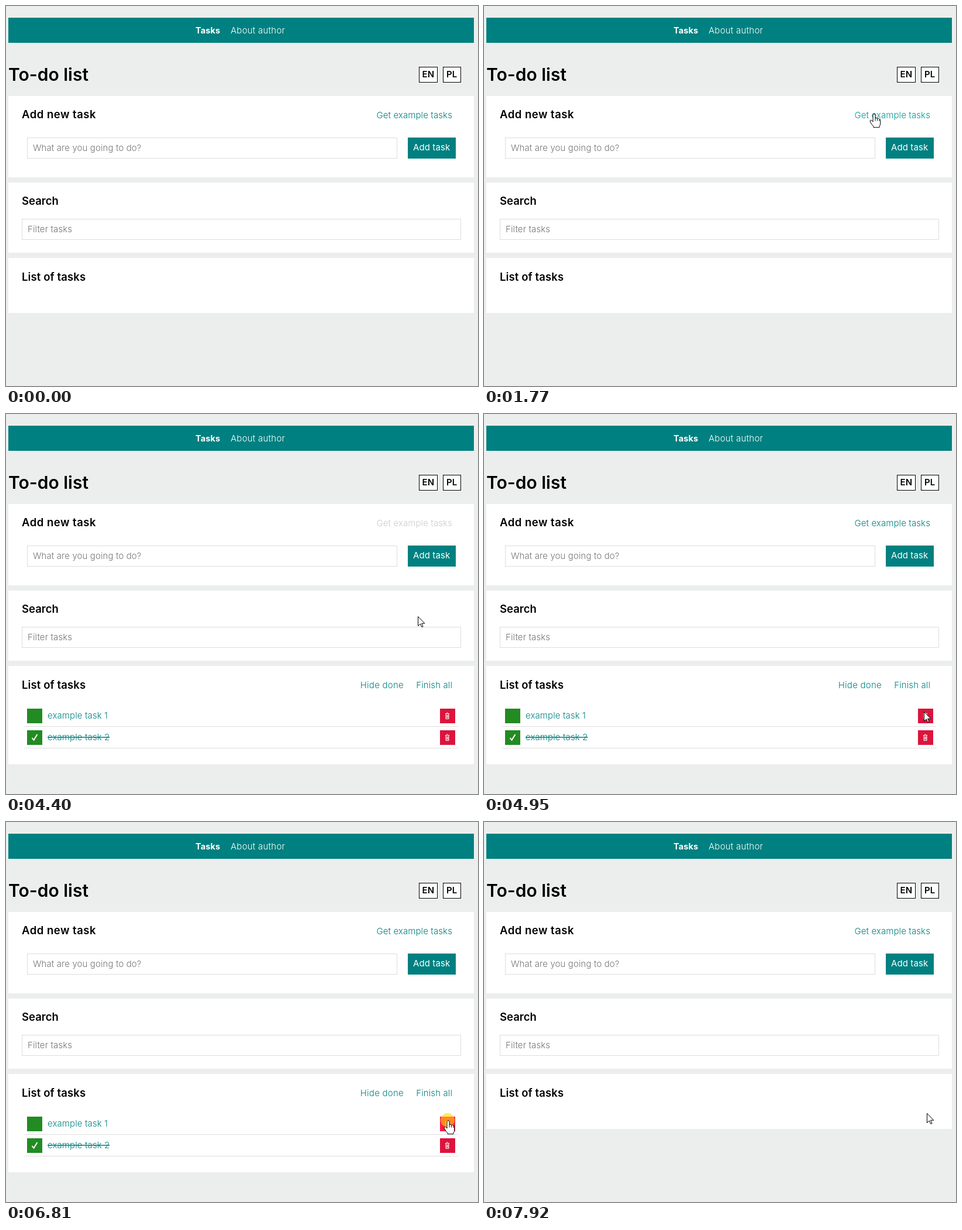
These frames come from a looping animation (807x650 px, 7990 ms). An HTML page:

```html
<!DOCTYPE html>
<html lang="en">
<head>
<meta charset="utf-8">
<title>To-do list</title>
<style>
  html, body { margin: 0; width: 100%; height: 100%; overflow: hidden; background: #eceeed; }
  svg { display: block; width: 807px; height: 650px; }
  text { font: 300 15px Inter, "Open Sans", sans-serif; fill: teal; letter-spacing: .1px; }
  .h2 { font-weight: 600; font-size: 18.5px; fill: #000; letter-spacing: .1px; }
  .h1 { font-weight: 600; font-size: 30px; fill: #000; letter-spacing: 0; }
  .lang { font-weight: 600; fill: #000; }
  .hint { fill: #757575; }
  .light { fill: #fff; }
  .end { text-anchor: end; }
  .panel { fill: #fff; }
  .field { fill: #fff; stroke: #ddd; }
  .box { fill: #fff; stroke: #000; }
  .rule { stroke: #ddd; }
  .mark { fill: none; stroke: #fff; }
  #pointer path { fill: #fff; stroke: #000; stroke-linejoin: round; }
</style>
</head>
<body>
<svg viewBox="0 0 807 650">
  <rect x="4" y="20" width="796" height="43" fill="teal"/>
  <text x="324" y="47" class="light" style="font-weight:700;font-size:14.5px">Tasks</text>
  <text x="384" y="47" class="light" style="letter-spacing:.25px">About author</text>

  <text x="4" y="128" class="h1">To-do list</text>
  <rect x="706.5" y="104.5" width="31" height="26" class="box"/>
  <text x="711.5" y="122" class="lang">EN</text>
  <rect x="747.5" y="104.5" width="30" height="26" class="box"/>
  <text x="753" y="122" class="lang">PL</text>

  <rect x="4" y="154" width="796" height="139" class="panel"/>
  <text x="27" y="192" class="h2" style="letter-spacing:.5px">Add new task</text>
  <text x="763" y="192" class="end" id="fetch"></text>
  <rect x="36.5" y="225.5" width="632" height="35" class="field"/>
  <text x="46" y="248" class="hint">What are you going to do?</text>
  <rect x="687" y="225" width="82" height="36" fill="teal"/>
  <text x="696" y="247" class="light" style="font-weight:400">Add task</text>

  <rect x="4" y="302" width="796" height="120" class="panel"/>
  <text x="27" y="340" class="h2" style="letter-spacing:0">Search</text>
  <rect x="27.5" y="364.5" width="750" height="35" class="field"/>
  <text x="37" y="387" class="hint">Filter tasks</text>

  <rect x="4" y="431" width="796" height="94" class="panel" id="list"/>
  <text x="27" y="470" class="h2">List of tasks</text>
  <g id="actions">
    <text x="680" y="469" class="end" style="letter-spacing:.25px">Hide done</text>
    <text x="763" y="469" class="end">Finish all</text>
  </g>
  <g id="rows"></g>

  <circle id="click" r="12" fill="#ffd700" fill-opacity=".6"/>
  <g id="pointer">
    <path id="arrow" d="M.5.5V16.5L4.3 13 6.8 18.5 9 17.6 6.6 12.2H11.8Z"/>
    <g id="hand">
      <path d="M-2 2.5Q0-1.5 2 2.5V8Q4.3 6.2 5.5 8.5 7.8 7 9 9.5 10.7 9.2 10.7 11.5V16Q10.7 20 9 22V23.7H-1V22Q-4 19-6.8 14-7.5 11.3-5.3 11.2-4 11.3-2 14Z"/>
      <path d="M2 8v4.5M5.5 9v3.5M9 10v3"/>
    </g>
  </g>
</svg>
<script>
const LOOP = 7990;
const $ = id => document.getElementById(id);
const between = (t, a, b) => t >= a && t < b;
const show = (el, on) => el.style.display = on ? "" : "none";

// Linear interpolation through [time, ...values] stops.
function track(t, stops) {
  const next = stops.findIndex(s => s[0] > t);
  if (next === 0) return stops[0].slice(1);
  if (next < 0) return stops[stops.length - 1].slice(1);
  const a = stops[next - 1], b = stops[next];
  const k = (t - a[0]) / (b[0] - a[0]);
  return a.slice(1).map((v, i) => v + (b[i + 1] - v) * k);
}
const rgb = c => `rgb(${c.map(Math.round)})`;

const path = [
  [460, 645, 626], [700, 648, 450], [900, 657, 283], [1220, 668, 190], [1500, 667, 184],
  [2100, 667, 184], [2300, 678, 235], [2500, 697, 325], [2720, 704, 346],
  [4400, 704, 346], [4650, 712, 385], [4900, 748, 500], [5160, 766, 545],
  [5300, 766, 543], [5510, 760, 525], [5750, 757, 514], [6000, 756, 510]
];
const linkColor = [
  [1150, 0, 128, 128], [1350, 0, 153, 153], [2030, 0, 153, 153],
  [2400, 204, 204, 204], [4400, 204, 204, 204], [4800, 0, 128, 128]
];
const red = [220, 20, 60], bright = [255, 24, 72];
const binColor = [
  [[5500, ...red], [5750, ...bright]],
  [[5050, ...red], [5200, ...bright], [5510, ...bright], [5750, ...red], [6950, ...red], [7150, ...bright]]
];

$("rows").innerHTML = [1, 2].map(n => `<g>
  <rect x="36" y="504" width="26" height="25" fill="#228b22"/>
  ${n === 2 ? '<path d="M44.5 517l3 3.8 6-9.8" class="mark" stroke-width="2"/>' : ""}
  <text x="71" y="521" ${n === 2 ? 'text-decoration="line-through"' : ""}>example task ${n}</text>
  <rect x="742" y="504" width="26" height="25" class="bin"/>
  <path d="M751 512.5h7M753.5 511h2M752 513v8.5h5V513M753.7 514.5v5.5M755.5 514.5v5.5" class="mark"/>
  <path d="M31 534.5H773" class="rule"/></g>`).join("");
const rows = [...$("rows").children];

function draw(t) {
  $("fetch").textContent = between(t, 2100, 4400) ? "Loading..." : "Get example tasks";
  $("fetch").style.fill = rgb(track(t, linkColor));

  const visible = [between(t, 4400, 6950), between(t, 4400, 7500)];
  let count = 0;
  rows.forEach((row, i) => {
    show(row, visible[i]);
    row.setAttribute("transform", `translate(0 ${count * 37})`);
    row.querySelector(".bin").style.fill = rgb(track(t, binColor[i]));
    if (visible[i]) count++;
  });
  show($("actions"), count > 0);
  $("list").setAttribute("height", 94 + count * 37);

  const [x, y] = t < 7920 ? track(t, path) : [757, 498];
  const hand = between(t, 1150, 2170) || between(t, 5050, 5330) || between(t, 5480, 7920);
  show($("pointer"), t >= 460);
  show($("hand"), hand);
  show($("arrow"), !hand);
  $("pointer").setAttribute("transform", `translate(${Math.round(x)} ${Math.round(y)})`);

  show($("click"), between(t, 1900, 2030) || between(t, 6810, 6950) || between(t, 7290, 7430));
  $("click").setAttribute("cx", x - 1);
  $("click").setAttribute("cy", y);
}

function tick() {
  draw(performance.now() % LOOP);
  requestAnimationFrame(tick);
}
tick();
</script>
</body>
</html>
```
